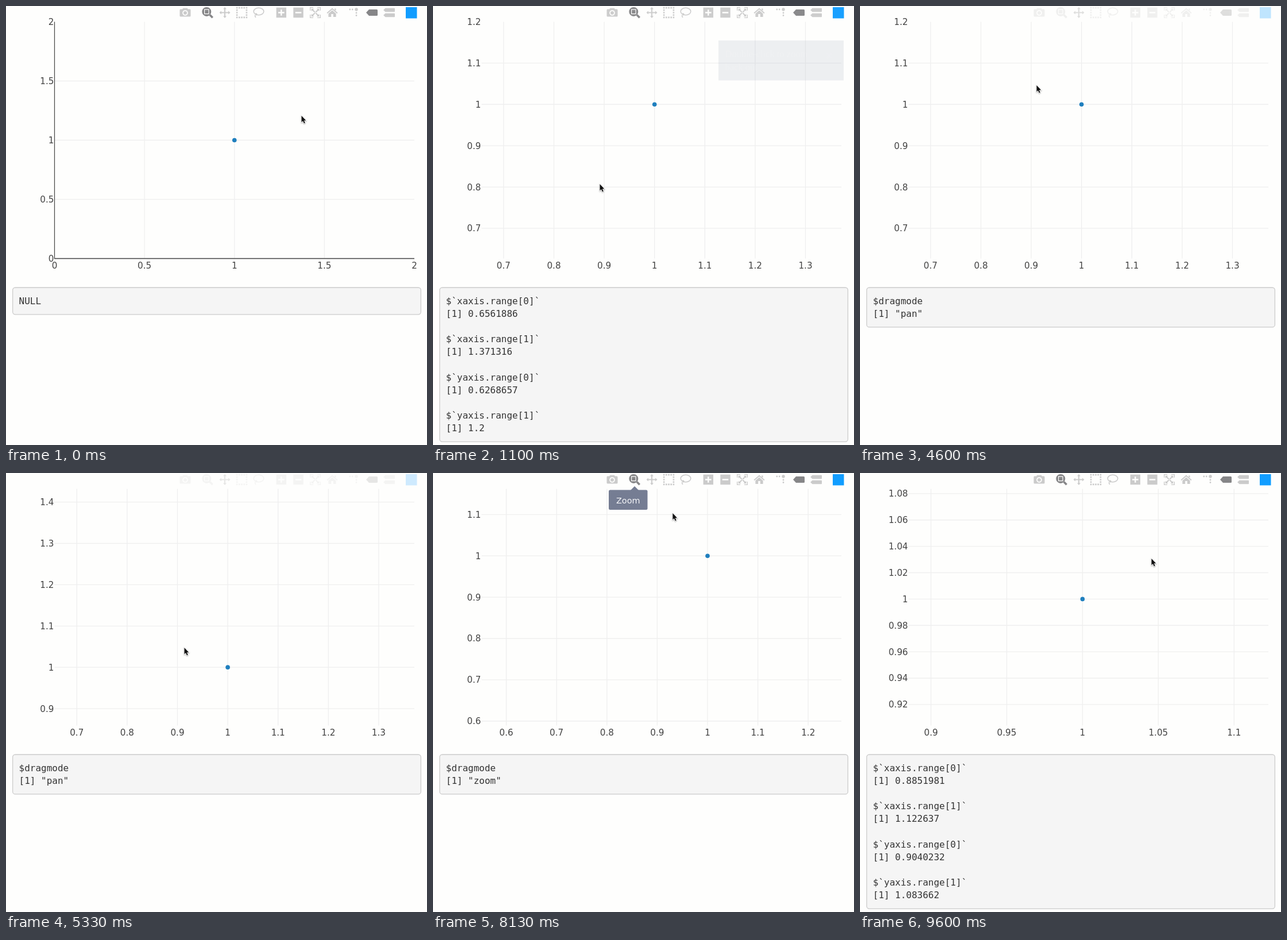
An HTML page with a canvas for the animation above (9.76 s loop, 733x764 px).

```html
<!DOCTYPE html>
<html lang="en">
<head>
<meta charset="utf-8">
<title>Plot events</title>
<style>
  html, body { margin: 0; width: 100%; height: 100%; overflow: hidden; background: #fefefd; }
  canvas { display: block; }
</style>
</head>
<body>
<canvas id="stage" width="733" height="764"></canvas>
<script>
const ctx = document.getElementById('stage').getContext('2d');
const LOOP = 9760;
const PAPER = '#fefefd';
const SANS = '"DejaVu Sans", Verdana, sans-serif';
const MONO = '"DejaVu Sans Mono", Menlo, monospace';
const SERIF = '"Liberation Serif", Times, serif';
const plot = { x: 84.5, y: 27.5, w: 626.5, h: 412 };

const clamp = v => Math.min(1, Math.max(0, v));
const progress = (t, start, length) => clamp((t - start) / length);
const smooth = u => u * u * (3 - 2 * u);
const cssEase = u => smooth(u ** 0.55);
const cubicInOut = u => u < 0.5 ? 4 * u ** 3 : 1 - 4 * (1 - u) ** 3;

// Pointer path: time, x, y
const pointer = [
  [0, 514, 191], [230, 514, 191], [597, 317, 283], [630, 307, 292.5], [760, 290, 310],
  [1900, 290, 310], [2060, 351, 1], [2260, 351, 1], [2460, 377, 3], [2560, 381, 11],
  [3530, 381, 11], [3760, 307, 138], [4600, 307, 138], [4660, 309.6, 137.1],
  [5130, 310, 304], [5950, 310, 304], [6280, 402, 110], [6900, 402, 110],
  [7060, 391, 34], [7200, 391, 34], [7330, 348, 16], [7830, 348, 16],
  [7960, 420, 70], [8100, 420, 70], [8130, 417, 70], [8330, 377.4, 83.6],
  [8370, 377.4, 83.6], [8780, 585.5, 212.7], [9400, 585.5, 212.7],
  [9600, 507, 149], [LOOP, 507, 149]
];

const slope = (i, axis) => {
  const a = pointer[i], b = pointer[i + 1];
  return a && b ? (b[axis] - a[axis]) / (b[0] - a[0]) : 0;
};
const tangent = (i, axis) => {
  const before = slope(i - 1, axis), after = slope(i, axis);
  return before * after > 0 ? 2 * before * after / (before + after) : 0;
};

// Monotone cubic interpolation: no overshoot at the stops
function pointerAt(t) {
  const i = Math.max(0, pointer.findIndex(key => key[0] > t) - 1);
  const a = pointer[i], b = pointer[i + 1], d = b[0] - a[0], u = (t - a[0]) / d;
  return [1, 2].map(axis => {
    const s = smooth(u);
    return a[axis] + (b[axis] - a[axis]) * s
      + d * u * (1 - u) * (tangent(i, axis) * (1 - u) - tangent(i + 1, axis) * u);
  });
}

const fullRange = [0, 2, 0, 2];
const zoomed = [0.6561886, 1.371316, 0.6268657, 1.2];
const pannedDown = [0.655732, 1.37086, 0.8590357, 1.43217];
const panned = [0.5508162, 1.265944, 0.589227, 1.162361];
const zoomedAgain = [0.8851981, 1.122637, 0.9040232, 1.083662];

function viewAt(t) {
  if (t < 860) return { range: fullRange, dx: 0.5, dy: 0.5 };
  if (t >= 8810) return { range: zoomedAgain, dx: 0.05, dy: 0.02 };
  let range = zoomed;
  if (t >= 6300) range = panned;
  else if (t > 4660) {
    const [gx, gy] = pointerAt(4660), [px, py] = pointerAt(t);
    const [x0, x1, y0, y1] = zoomed;
    const sx = (px - gx) * (x1 - x0) / plot.w, sy = (py - gy) * (y1 - y0) / plot.h;
    range = [x0 - sx, x1 - sx, y0 + sy, y1 + sy];
  }
  return { range, dx: 0.1, dy: 0.1 };
}

const rangeText = r => r.map((v, i) =>
  ['$`' + 'xy'[i >> 1] + 'axis.range[' + i % 2 + ']`', '[1] ' + v]).flatMap((p, i) => i ? ['', ...p] : p);
const modeText = mode => ['$dragmode', `[1] "${mode}"`];
const outputs = [
  [0, ['NULL']], [950, rangeText(zoomed)], [2680, modeText('pan')], [5350, rangeText(pannedDown)],
  [6370, rangeText(panned)], [7450, modeText('zoom')], [8900, rangeText(zoomedAgain)]
];

function text(str, x, y, font, color, align = 'left') {
  ctx.font = font;
  ctx.fillStyle = color;
  ctx.textAlign = align;
  ctx.fillText(str, x, y);
}

function line(x1, y1, x2, y2, color, width) {
  ctx.beginPath();
  ctx.moveTo(x1, y1);
  ctx.lineTo(x2, y2);
  ctx.strokeStyle = color;
  ctx.lineWidth = width;
  ctx.stroke();
}

function ticks(low, high, step) {
  const list = [];
  for (let i = Math.ceil(low / step - 1e-6); i * step <= high + 1e-6; i++) list.push(+(i * step).toFixed(2));
  return list;
}

function drawPlot(t) {
  const { range: [x0, x1, y0, y1], dx, dy } = viewAt(t);
  const { x, y, w, h } = plot, right = x + w, bottom = y + h;
  const toX = v => x + (v - x0) / (x1 - x0) * w;
  const toY = v => bottom - (v - y0) / (y1 - y0) * h;
  const font = '15.2px ' + SANS, grid = '#efefef';

  for (const v of ticks(x0, x1, dx)) {
    const px = toX(v);
    if (px < right - 1) line(px, y, px, bottom, grid, 1.3);
    text(v, px, 456.5, font, '#444', 'center');
  }
  for (const v of ticks(y0, y1, dy)) {
    const py = toY(v);
    if (py > y + 1) line(x, py, right, py, grid, 1.3);
    text(v, 83.5, py + 5.5, font, '#444', 'right');
  }
  ctx.beginPath();
  ctx.arc(toX(1), toY(1), 3.8, 0, 7);
  ctx.fillStyle = '#1f7fbe';
  ctx.fill();

  if (t > 230 && t < 860) drawZoomBox(t, 230);
  if (t > 8370 && t < 8810) drawZoomBox(t, 8370);
  if (x0 === 0) {
    line(x, y, x, bottom + 0.6, '#444', 1.2);
    line(x, bottom, right, bottom, '#444', 1.3);
  }
}

function drawZoomBox(t, start) {
  const [ax, ay] = pointerAt(start), [bx, by] = pointerAt(Math.max(start, t - 33));
  const left = Math.min(ax, bx) + 0.3, top = Math.min(ay, by) + 1;
  const w = Math.abs(bx - ax), h = Math.abs(by - ay);
  if (w < 8 || h < 8) return;
  ctx.beginPath();
  ctx.rect(plot.x, plot.y, plot.w, plot.h);
  ctx.rect(left, top, w, h);
  ctx.fillStyle = `rgba(0,0,0,${0.365 * progress(t, start + 30, 200)})`;
  ctx.fill('evenodd');

  const arm = Math.min(12, w / 2, h / 2);
  for (const [cx, sx] of [[left, 1], [left + w, -1]])
    for (const [cy, sy] of [[top, 1], [top + h, -1]]) {
      ctx.save();
      ctx.translate(cx, cy);
      ctx.scale(sx, sy);
      const corner = new Path2D(`M-4 ${arm}h3.4V-.6H${arm}V-4H-4z`);
      ctx.fillStyle = '#fff';
      ctx.fill(corner);
      ctx.strokeStyle = '#444';
      ctx.lineWidth = 1.2;
      ctx.stroke(corner);
      ctx.restore();
    }
}

// Toolbar shapes around (0, 0); holes wind the other way
const disc = (x, y, r, sweep = 1) => oval(x, y, r, r, sweep);
function oval(x, y, rx, ry, sweep = 1) {
  return `M${x - rx} ${y}a${rx} ${ry} 0 1 ${sweep} ${2 * rx} 0a${rx} ${ry} 0 1 ${sweep} ${-2 * rx} 0z`;
}
const tile = 'M-8.7-8.7h17.4v17.4h-17.4z';

function dottedSquare() {
  let path = '';
  for (let i = -2; i <= 2; i++)
    for (let j = -2; j <= 2; j++)
      if (Math.abs(i) === 2 || Math.abs(j) === 2) path += `M${i * 4.2 - 1.3} ${j * 4.2 - 1.3}h2.6v2.6h-2.6z`;
  return path;
}

function expandArrows() {
  const shapes = [
    [9.5, 9.5, 9.5, 3.5, 8.2, 3.5, 8.2, 8.2, 3.5, 8.2, 3.5, 9.5],
    [6.8, 6.8, 6.8, 2.2, 5.3, 3.7, 1.3, 0, 0, 1.3, 3.7, 5.3, 2.2, 6.8]
  ];
  let path = '';
  for (const sx of [1, -1])
    for (const sy of [1, -1])
      for (const s of shapes) path += 'M' + s.map((v, i) => v * (i % 2 ? sy : sx)).join(' ') + 'z';
  return path;
}

const icons = [
  ['camera', 312, 'M-9.5-4.5q0-1.5 1.5-1.5h3l1.5-1.7h7l1.5 1.7h3q1.5 0 1.5 1.5v10q0 1.5-1.5 1.5h-16q-1.5 0-1.5-1.5z'
    + disc(0, 0.5, 4.8, 0) + disc(0, 0.5, 3)],
  ['zoom', 351, disc(-1.7, -1.6, 8) + 'M2.5 5.1l5 5 2.5-2.5-5-5z'
    + 'M-6-5.9v8.6h8.6v-8.6zM-4.8-4.7h6.2v6.2h-6.2z'],
  ['pan', 381, 'M0-9.5l3 3.5h-2v5h5v-2l3.5 3-3.5 3v-2h-5v5h2l-3 3.5-3-3.5h2v-5h-5v2l-3.5-3 3.5-3v2h5v-5h-2z'],
  ['select', 410.5, dottedSquare()],
  ['lasso', 440, oval(0, -2, 9.6, 7) + oval(0, -2, 8, 5.4, 0) + disc(-4.5, 3, 2.1) + 'M-6.4 3q-2 4 1.2 6l.8-1.3q-2-1-.6-4z'],
  ['plus', 479.3, tile + 'M-1.2-5.3v4.1h-4.1v2.4h4.1v4.1h2.4v-4.1h4.1v-2.4h-4.1v-4.1z'],
  ['minus', 509, tile + 'M-5.3-1.2v2.4h10.6v-2.4z'],
  ['autoscale', 538.5, expandArrows()],
  ['home', 568, 'M0-8l9.5 8.3-1.2 1.4-8.3-7.1-8.3 7.1-1.2-1.4z'
    + 'M-6.6 1.8l6.6-5.7 6.6 5.7v5.7h-4.8v-5h-3.6v5h-4.8zM4-7h2.5v4l-2.5-2.2z'],
  ['spikes', 605, disc(-6.2, -5.5, 1.4) + disc(-1.8, -5.5, 1.4) + disc(5, -5.5, 2.7) + disc(5, 0.5, 1.4) + disc(5, 5, 1.4)],
  ['closest', 637, 'M-10 0l5-5.5h13.5q1.5 0 1.5 1.5v8q0 1.5-1.5 1.5h-13.5z'],
  ['compare', 667, 'M-10-4.5l3.5-3.2h15.5q1 0 1 1v4.4q0 1-1 1h-15.5zM-10 4.5l3.5-3.2h15.5q1 0 1 1v4.4q0 1-1 1h-15.5z']
].map(([name, x, path]) => ({ name, x, path: new Path2D(path) }));

// Toolbar hides and shows alternately at these times
const toolbarToggles = [240, 860, 4460, 5300, 5930, 6328, 8370, 8820];

function drawToolbar(t) {
  const passed = toolbarToggles.filter(time => time <= t);
  const u = passed.length ? cssEase(progress(t, passed.at(-1), 300)) : 1;
  const mode = t >= 2680 && t < 7400 ? 'pan' : 'zoom';
  ctx.globalAlpha = passed.length % 2 ? 1 - u : u;
  for (const { name, x, path } of icons) {
    ctx.save();
    ctx.translate(x, 11.5);
    ctx.fillStyle = name === mode || name === 'closest' ? '#868688' : '#cbcbcb';
    ctx.fill(path);
    ctx.restore();
  }
  ctx.fillStyle = '#119dff';
  ctx.fillRect(696, 2, 19.5, 19.5);
  ctx.globalAlpha = 1;

  if (t >= 2520 && t < 4150) drawTooltip('Pan', 381, 53);
  if (t >= 7310 && t < 8160) drawTooltip('Zoom', 351, 67.5);
}

function drawTooltip(label, x, width) {
  const left = x + 22.5 - width;
  ctx.fillStyle = '#757d93';
  ctx.beginPath();
  ctx.roundRect(left, 29.5, width, 34.5, 2.5);
  ctx.fill();
  ctx.fill(new Path2D(`M${x - 7} 30l7-7 7 7z`));
  text(label, left + width / 2, 52.5, '14.4px ' + SANS, '#f4f5f8', 'center');
}

function drawNotice(t) {
  const alpha = cubicInOut(progress(t, 860, 700)) - cubicInOut(progress(t, 2260, 700));
  if (alpha <= 0) return;
  ctx.globalAlpha = alpha;
  ctx.fillStyle = 'rgba(140,151,175,0.9)';
  ctx.fillRect(497, 60, 218, 69.5);
  const font = '16.5px ' + SERIF;
  text('Double-click to zoom', 508.5, 89, font, '#fff');
  text('back out', 508.5, 112, font, '#fff');
  line(685, 81.5, 694.5, 91, '#f4f5f8', 2.6);
  line(694.5, 81.5, 685, 91, '#f4f5f8', 2.6);
  ctx.globalAlpha = 1;
}

function drawOutput(t) {
  const lines = outputs.findLast(([time]) => time <= t)[1], step = 22.15;
  ctx.beginPath();
  ctx.roundRect(11.6, 490, 710.8, 46.8 + step * (lines.length - 1), 4.5);
  ctx.fillStyle = '#f5f5f5';
  ctx.fill();
  ctx.strokeStyle = '#ccc';
  ctx.lineWidth = 1.3;
  ctx.stroke();
  lines.forEach((str, i) => text(str, 22.5, 518.8 + i * step, '16px ' + MONO, '#333'));
}

const arrow = new Path2D('M.5 0v11.2l2.5-2.3 1.9 4.3 1.9-.8-1.9-4.2h3.4z');
function drawPointer(t) {
  ctx.save();
  ctx.translate(...pointerAt(t));
  ctx.shadowColor = 'rgba(0,0,0,0.35)';
  ctx.shadowBlur = 2;
  ctx.shadowOffsetY = 1;
  ctx.strokeStyle = '#fff';
  ctx.lineWidth = 1.6;
  ctx.stroke(arrow);
  ctx.shadowColor = 'transparent';
  ctx.fillStyle = '#111';
  ctx.fill(arrow);
  ctx.restore();
}

function draw(now) {
  const t = now % LOOP;
  ctx.fillStyle = PAPER;
  ctx.fillRect(0, 0, 733, 764);
  drawPlot(t);
  drawOutput(t);
  drawNotice(t);
  drawToolbar(t);
  drawPointer(t);
}

const begin = performance.now();
function tick() {
  draw(performance.now() - begin);
  requestAnimationFrame(tick);
}
tick();
</script>
</body>
</html>
```
